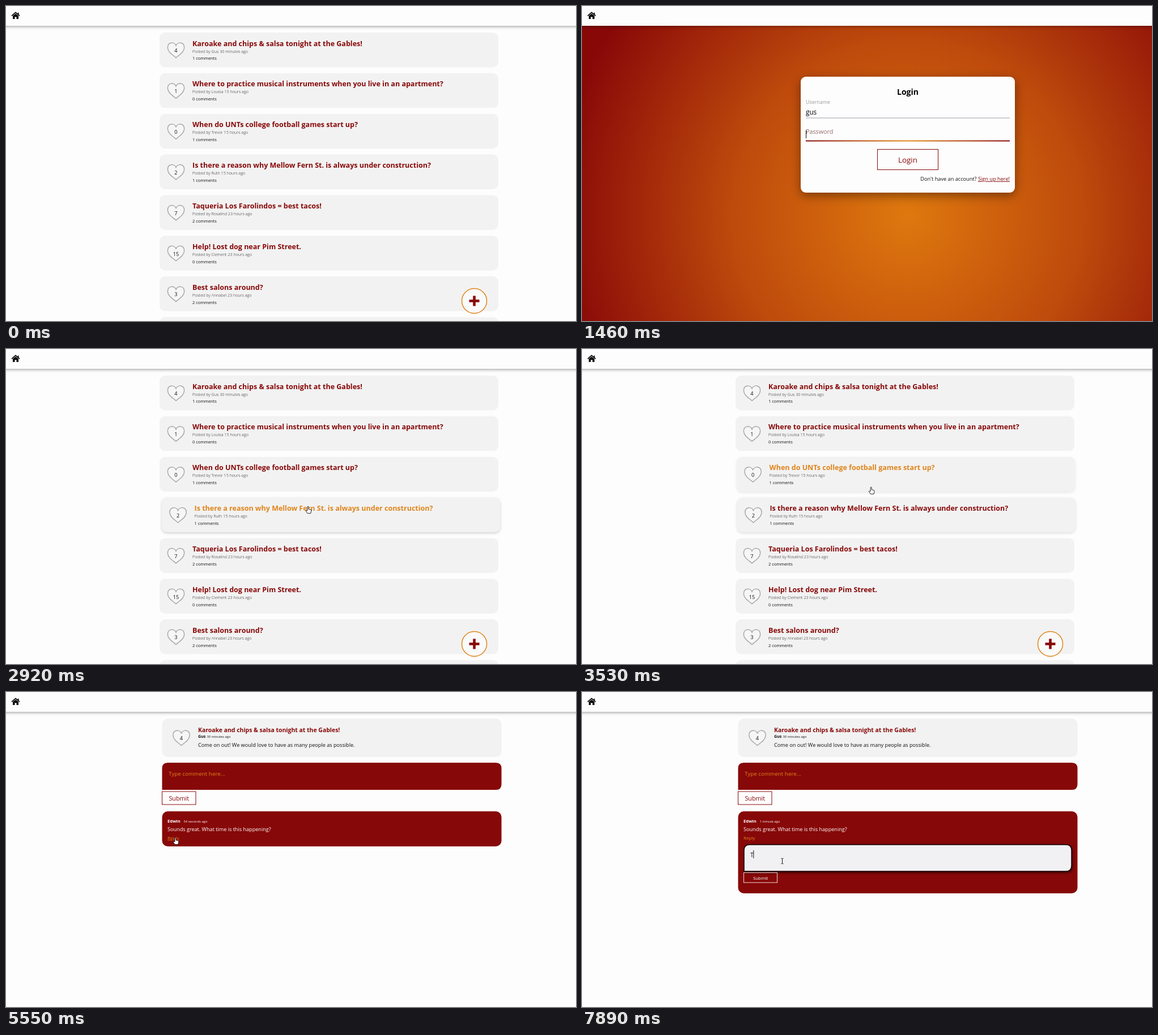
Animation of 1006x557 px, one loop 7990 ms. Source, as an HTML page:

```html
<!DOCTYPE html>
<html lang="en">
<head>
<meta charset="utf-8">
<title>Community board</title>
<style>
html, body { margin: 0; width: 100%; height: 100%; overflow: hidden; background: #fdfdfd; }
svg { display: block; width: 1006px; height: 557px; font-family: "Open Sans", "Noto Sans", sans-serif; }
text { white-space: pre; }
.bar { filter: drop-shadow(0 2px 2.5px rgba(0, 0, 0, .32)); }
.panel { filter: drop-shadow(0 5px 9px rgba(0, 0, 0, .42)); }
.field { filter: drop-shadow(1px 2px 2px rgba(0, 0, 0, .6)); }
</style>
</head>
<body>
<svg viewBox="0 0 1006 557">
  <defs>
    <radialGradient id="glow" gradientUnits="userSpaceOnUse" cx="575" cy="370" r="620">
      <stop offset="0" stop-color="#de780e"/>
      <stop offset=".5" stop-color="#be4a0c"/>
      <stop offset="1" stop-color="#880808"/>
    </radialGradient>
    <linearGradient id="line">
      <stop offset="0" stop-color="#870808"/>
      <stop offset=".5" stop-color="#e58a1a"/>
      <stop offset="1" stop-color="#870808"/>
    </linearGradient>
  </defs>
  <g id="page"></g>
  <g class="bar"><rect x="-10" y="-10" width="1026" height="45" fill="#fdfdfd"/></g>
  <path d="M10 17.3 17 11.4 24 17.3M21.7 11.8V15" fill="none" stroke="#000" stroke-width="1.7"/>
  <path d="M12 17.6 17 13.5 22 17.6V23H18.5V19.3H15.5V23H12Z"/>
  <g id="cursor"></g>
</svg>
<script>
const LOOP = 7990, RED = '#870808', ORANGE = '#e0841a', GREY = '#f2f2f2';
const LOGIN = 570, LIST = 2840, POST = 4600, REPLY = 5900;
const MINUTE = 6500, FOCUS = 7000, TYPE_T = 7600;
const NAME_KEYS = [1000, 1120, 1250], PASS_FOCUS = 1400;
const PASS_KEYS = [1550, 1640, 1730, 1820, 1910, 2000];

const posts = [
  [4, 'Karoake and chips & salsa tonight at the Gables!', 'Gus 30 minutes', 1],
  [1, 'Where to practice musical instruments when you live in an apartment?', 'Louisa 15 hours', 0],
  [0, 'When do UNTs college football games start up?', 'Trevor 15 hours', 1],
  [2, 'Is there a reason why Mellow Fern St. is always under construction?', 'Ruth 15 hours', 1],
  [7, 'Taqueria Los Farolindos = best tacos!', 'Rosalind 23 hours', 2],
  [15, 'Help! Lost dog near Pim Street.', 'Clement 23 hours', 0],
  [3, 'Best salons around?', 'Annabel 23 hours', 2],
  [5, '', '', 0]
];

// time, x, y of the pointer's hot spot
const path = [
  [2400, 460, 130], [2540, 473.5, 171.5], [2760, 533, 278], [3300, 533, 278],
  [4200, 394, 69], [4850, 394, 69], [5400, 299, 257], [6100, 299, 257], [6800, 353.5, 299]
];

const page = document.getElementById('page'), cursor = document.getElementById('cursor');
const clamp = v => Math.max(0, Math.min(1, v));
const mix = (a, b, p) => a + (b - a) * p;
const typed = (keys, t) => keys.filter(k => k <= t).length;

const text = (x, y, size, str, fill = '#111', weight = 400, more = '') =>
  `<text x="${x}" y="${y}" font-size="${size}" fill="${fill}" font-weight="${weight}" ${more}>${str.replace(/&/g, '&amp;')}</text>`;
const centred = (x, y, size, str, fill, weight) => text(x, y, size, str, fill, weight, 'text-anchor="middle"');
const rect = (x, y, w, h, fill, r = 0, more = '') =>
  `<rect x="${x}" y="${y}" width="${w}" height="${h}" rx="${r}" fill="${fill}" ${more}/>`;
const button = (x, y, w, h, color) => rect(x, y, w, h, 'none', 0, `stroke="${color}"`);
// rounded box whose bottom left corner stays square
const area = (x, y, w, h, fill, more = '') =>
  `<path d="M${x} ${y + h}v${10 - h}q0 -10 10 -10h${w - 20}q10 0 10 10v${h - 20}q0 10 -10 10z" fill="${fill}" ${more}/>`;

function caret(x, y, h, since) {
  return since >= 0 && since % 1060 < 530 ? rect(x, y, 1, h, '#111') : '';
}

function heart(x, y, count) {
  return `<path transform="translate(${x} ${y})" d="M0 -8C-3 -15 -15 -15 -14.6 -4C-14 4 -6 8 0 13.5C6 8 14 4 14.6 -4C15 -15 3 -15 0 -8Z"
    fill="#f6f6f6" stroke="#a3a3a3" stroke-width="1.4"/>` + centred(x, y + 4.3, 9.2, String(count));
}

function pointer(t) {
  let i = path.findIndex(p => p[0] > t);
  if (i < 0) i = path.length;
  const a = path[Math.max(0, i - 1)], b = path[Math.min(i, path.length - 1)];
  let p = a === b ? 0 : clamp((t - a[0]) / (b[0] - a[0]));
  p = p * p * (3 - 2 * p);
  return [mix(a[1], b[1], p), mix(a[2], b[2], p)];
}

const cardTop = i => 47 + i * 71.85;

function hovers(i, t) {
  if (t < LIST || t >= POST) return false;
  const y = pointer(t)[1] - cardTop(i);
  return y >= 0 && y < 62;
}

// linear 150 ms ease towards the hovered state
function lift(i, t) {
  let n = 0;
  for (let k = 0; k < 15; k++) n += hovers(i, t - k * 10);
  return n / 15;
}

function card(post, i, t) {
  const [likes, title, by, comments] = post, y = cardTop(i), p = lift(i, t);
  const shadow = p ? `style="filter:drop-shadow(0 2px 2px rgba(0,0,0,${.28 * p}))"` : '';
  return `<g transform="translate(${6 * p} 0)">` +
    rect(271, y, 598, 61.5, GREY, 10, shadow) + heart(300, y + 31, likes) +
    text(329, y + 23.6, 12.5, title, hovers(i, t) ? ORANGE : RED, 700) +
    text(329, y + 35.6, 7.2, `Posted by ${by} ago`, '#222', 300) +
    text(329, y + 48.4, 7.4, `${comments} comments`) + '</g>';
}

function listPage(t) {
  return posts.map((p, i) => card(p, i, t)).join('') +
    `<circle cx="826.5" cy="521.5" r="22" fill="#fafafa" stroke="${ORANGE}" stroke-width="1.5"/>` +
    `<path d="M817.5 521.5h18M826.5 512.5v18" stroke="${RED}" stroke-width="4.6"/>`;
}

function field(y, name, up, focus) {
  const fill = `color-mix(in srgb, ${RED} ${focus ? up * 100 : 0}%, #999)`;
  return text(395, mix(y - 7, y - 25, up), mix(11.6, 8.9, up), name, '#999',
    focus && up > .5 ? 700 : 400, `style="fill:${fill}"`) +
    (focus ? rect(395, y - .5, 360, 2, 'url(#line)') : rect(395, y - .5, 360, 1, '#9f9da8'));
}

function loginPage(t) {
  const inPass = t >= PASS_FOCUS, n = typed(NAME_KEYS, t), m = typed(PASS_KEYS, t);
  const last = [LOGIN, PASS_FOCUS, ...NAME_KEYS, ...PASS_KEYS].filter(k => k <= t);
  const since = t - Math.max(...last);
  let s = rect(0, 30, 1006, 527, 'url(#glow)') +
    `<g class="panel">${rect(386, 125, 378, 205, '#fdfdfd', 9)}</g>` +
    centred(575, 157, 14, 'Login', '#000', 700) +
    field(198, 'Username', clamp((t - LOGIN - 10) / 200), !inPass) +
    field(238, 'Password', clamp((t - PASS_FOCUS) / 200), inPass) +
    text(395, 192, 11.7, 'gus'.slice(0, n), '#000');
  for (let i = 0; i < m; i++) s += `<circle cx="${399 + i * 7.6}" cy="228" r="3"/>`;
  s += inPass ? caret(395 + m * 7.6, 220, 14, since) : caret(395 + n * 6.4, 179, 15, since);
  return s + button(521.5, 253.5, 107, 36, RED) + centred(575, 277, 13.4, 'Login', RED) +
    text(755, 309, 9.2, `Don't have an account? <tspan fill="${RED}" text-decoration="underline">Sign up here!</tspan>`,
      '#111', 400, 'text-anchor="end"');
}

function postPage(t) {
  const open = t >= REPLY, [x, y] = pointer(t);
  const onReply = x < 306 && y > 251 && y < 264;
  let s = rect(275.5, 47, 599, 68, GREY, 10) + heart(309.5, 81, 4) +
    text(339, 71, 10.45, posts[0][1], RED, 700) +
    text(339, 81.3, 7.1, 'Gus', '#111', 700) + text(354.5, 81.3, 5.85, '30 minutes ago') +
    text(339, 96.5, 9.14, 'Come on out! We would love to have as many people as possible.') +
    area(275.5, 125, 599, 48, RED) + text(287, 148, 9.85, 'Type comment here...', ORANGE) +
    button(275.5, 176, 59.5, 23, RED) + centred(305.3, 191.7, 10.8, 'Submit', RED) +
    rect(275.5, 211, 599, open ? 145 : 62, RED, 10) +
    text(285, 230.8, 7.5, 'Edwin', '#fff', 700) +
    text(313.5, 230.8, 5.85, t < MINUTE ? '54 seconds ago' : '1 minute ago', '#fff') +
    text(285, 245.5, 9.1, 'Sounds great. What time is this happening?', '#fff') +
    text(285, 260.6, 8, 'Reply', ORANGE, 400, onReply ? 'text-decoration="underline"' : '');
  if (open) {
    const done = t >= TYPE_T;
    s += `<g class="field">${area(286, 270, 578, 47, '#f1f1f3', 'stroke="#180408" stroke-width="1.5"')}</g>` +
      (done ? text(297, 291.5, 10.2, 'T') : '') +
      caret(done ? 302.3 : 297, 280, 14, t - (done ? TYPE_T : FOCUS)) +
      button(285.5, 319.5, 59, 17.5, '#eed9d9') + centred(315, 331.8, 7.9, 'Submit', '#fff');
  }
  return s;
}

const shapes = {
  arrow: '<path d="M0 0V11.3L2.7 8.8 4.5 12.9 6.3 12.1 4.6 8.2H8Z" fill="#fff" stroke="#111" stroke-width=".9"/>',
  hand: '<path d="M-1 1Q0 -.6 1 1V5L5 6Q6 6.3 5.7 8L4.8 12.6H-1L-4 8Q-3.5 6.4 -1 8Z" fill="#fff" stroke="#111" stroke-width=".9"/>',
  beam: '<path d="M-2 -4.8Q0 -4.8 0 -3.6Q0 -4.8 2 -4.8M0 -3.6V3.6M-2 4.8Q0 4.8 0 3.6Q0 4.8 2 4.8" fill="none" stroke="#111"/>'
};

function shapeAt(x, y, t) {
  if (t < LIST) return x > 521 && y > 253 ? 'hand' : 'arrow';
  if (t < POST) return posts.some((p, i) => hovers(i, t)) ? 'hand' : 'arrow';
  if (y > 125 && y < 173 || t >= REPLY && y > 270 && y < 317) return 'beam';
  return x < 306 && y > 251 && y < 264 ? 'hand' : 'arrow';
}

function draw(now) {
  const t = now % LOOP;
  page.innerHTML = t < LOGIN ? listPage(t) : t < LIST ? loginPage(t) : t < POST ? listPage(t) : postPage(t);
  const [x, y] = pointer(t);
  cursor.innerHTML = t < path[0][0] ? '' : shapes[shapeAt(x, y, t)];
  cursor.setAttribute('transform', `translate(${x} ${y})`);
}

const start = performance.now();
function tick() {
  draw(performance.now() - start);
  requestAnimationFrame(tick);
}
tick();
</script>
</body>
</html>
```
